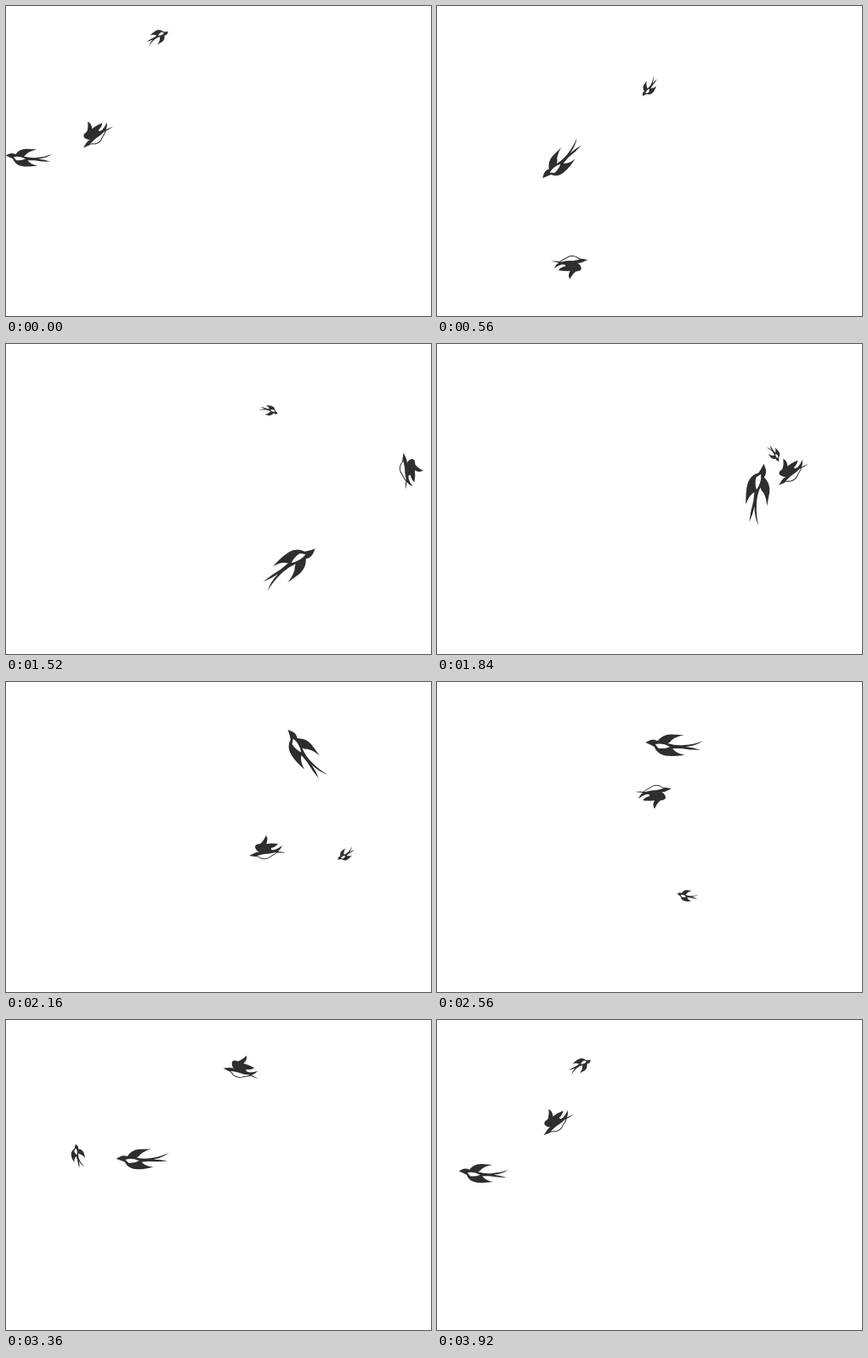
An HTML page with a canvas for the animation above (4000 ms loop, 500x364 px).

```html
<!DOCTYPE html>
<html lang="en">
<head>
<meta charset="utf-8">
<title>Swallows</title>
<style>
html, body { margin: 0; width: 100%; height: 100%; overflow: hidden; background: #fff; }
canvas { display: block; }
</style>
</head>
<body>
<canvas id="stage" width="500" height="364"></canvas>
<script>
const ctx = document.getElementById('stage').getContext('2d');
const INK = '#2e2e30';
const STEP = 80;
const STEPS = 50;

// Both silhouettes face left around their own centre.
const gliding = {
  body: new Path2D(
    'M-35-3L-31-5Q-26-8-20-5Q-14-13-4-13L12-12Q2-10-3-6Q-5-3-8-2Q2 1 12 0' +
    'Q25-1 35-5Q26 1 14 2Q24 3 32 6Q20 6 8 4L-2 4Q2 10 13 12Q-8 15-16 11' +
    'Q-22 8-24 2L-28 0ZM-23-1Q-14-3-5 2Q-12 5-19 4Z')
};
const flapping = {
  body: new Path2D(
    'M-21 8L-15 5Q-11 3-9 4Q-14 1-14-3Q-13-6-8-6Q-4-9-1-16Q2-11-1-6' +
    'Q5-7 13-6Q10-2 5-1Q4 2 9 1Q13 0 18-4Q16 1 13 3L22 4Q16 5 10 4Q3 6-3 6Q-9 7-14 9Z'),
  belly: new Path2D('M-14 8Q-9 9-7 11Q0 13 4 9Q8 7 12 4')
};

// Way points: step, x, y, heading in degrees.
const birds = [
  {
    shape: gliding,
    stretch: 1,
    scale: f => 1.07 - Math.abs(f - 19) * (f < 19 ? 0.015 : 0.0077),
    route: [
      [0, 27, 178, 180], [4, 60, 105, 0], [7, 147, 181, 132], [11, 62, 268, 85],
      [14, 165, 301, -3], [19, 333, 262, -40], [27, 352, 85, 230],
      [32, 279, 74, 180], [42, 161, 163, 175], [49, 55, 180, 180]
    ]
  },
  {
    shape: flapping,
    stretch: 1,
    scale: () => 1,
    route: [
      [0, 105, 149, 150], [7, 156, 305, 3], [19, 475, 149, -88], [27, 307, 196, 180],
      [32, 255, 133, 0], [37, 388, 98, -80], [42, 278, 57, 202], [49, 140, 118, 151]
    ]
  },
  {
    shape: gliding,
    stretch: 1.4,
    scale: f => 0.37 + 0.05 * Math.cos((f - 46) / STEPS * 2 * Math.PI),
    route: [
      [0, 178, 37, -36], [7, 250, 95, 120], [13, 262, 140, -20], [19, 309, 78, 10],
      [27, 400, 202, 139], [32, 295, 251, 183], [42, 85, 160, 250], [49, 168, 54, -36]
    ]
  }
];

const radians = degrees => degrees * Math.PI / 180;

// Length of a circular arc that spans the chord while turning between headings.
function arcLength(chord, from, to) {
  const half = Math.abs((to - from + 900) % 360 - 180) / 2;
  return half < 0.1 ? chord : chord * radians(half) / Math.sin(radians(half));
}

// Value and slope of a cubic from p to q with end slopes m and n.
function hermite(p, q, m, n, u) {
  const c = 3 * (q - p) - 2 * m - n;
  const d = 2 * (p - q) + m + n;
  return [p + u * (m + u * (c + u * d)), m + u * (2 * c + 3 * u * d)];
}

function locate(route, f) {
  const i = Math.max(1, route.findIndex(([step]) => step >= f));
  const [f0, x0, y0, h0] = route[i - 1];
  const [f1, x1, y1, h1] = route[i];
  const u = (f - f0) / (f1 - f0);
  const pull = arcLength(Math.hypot(x1 - x0, y1 - y0), h0, h1);
  const a = radians(h0);
  const b = radians(h1);
  const [x, dx] = hermite(x0, x1, pull * Math.cos(a), pull * Math.cos(b), u);
  const [y, dy] = hermite(y0, y1, pull * Math.sin(a), pull * Math.sin(b), u);
  return { x, y, heading: Math.atan2(dy, dx) };
}

function drawBird({ shape, stretch, scale, route }, f) {
  const { x, y, heading } = locate(route, f);
  const s = scale(f);
  ctx.save();
  ctx.translate(x, y);
  ctx.rotate(heading - Math.PI);
  ctx.scale(s, s * stretch);
  ctx.fill(shape.body, 'evenodd');
  if (shape.belly) ctx.stroke(shape.belly);
  ctx.restore();
}

function render(now) {
  const f = Math.floor(now / STEP) % STEPS;
  ctx.fillStyle = '#fff';
  ctx.fillRect(0, 0, 500, 364);
  ctx.fillStyle = ctx.strokeStyle = INK;
  birds.forEach(bird => drawBird(bird, f));
}

let start;
function tick(now) {
  start ??= now;
  render(Math.max(0, now - start));
  requestAnimationFrame(tick);
}
render(0);
requestAnimationFrame(tick);
</script>
</body>
</html>
```
